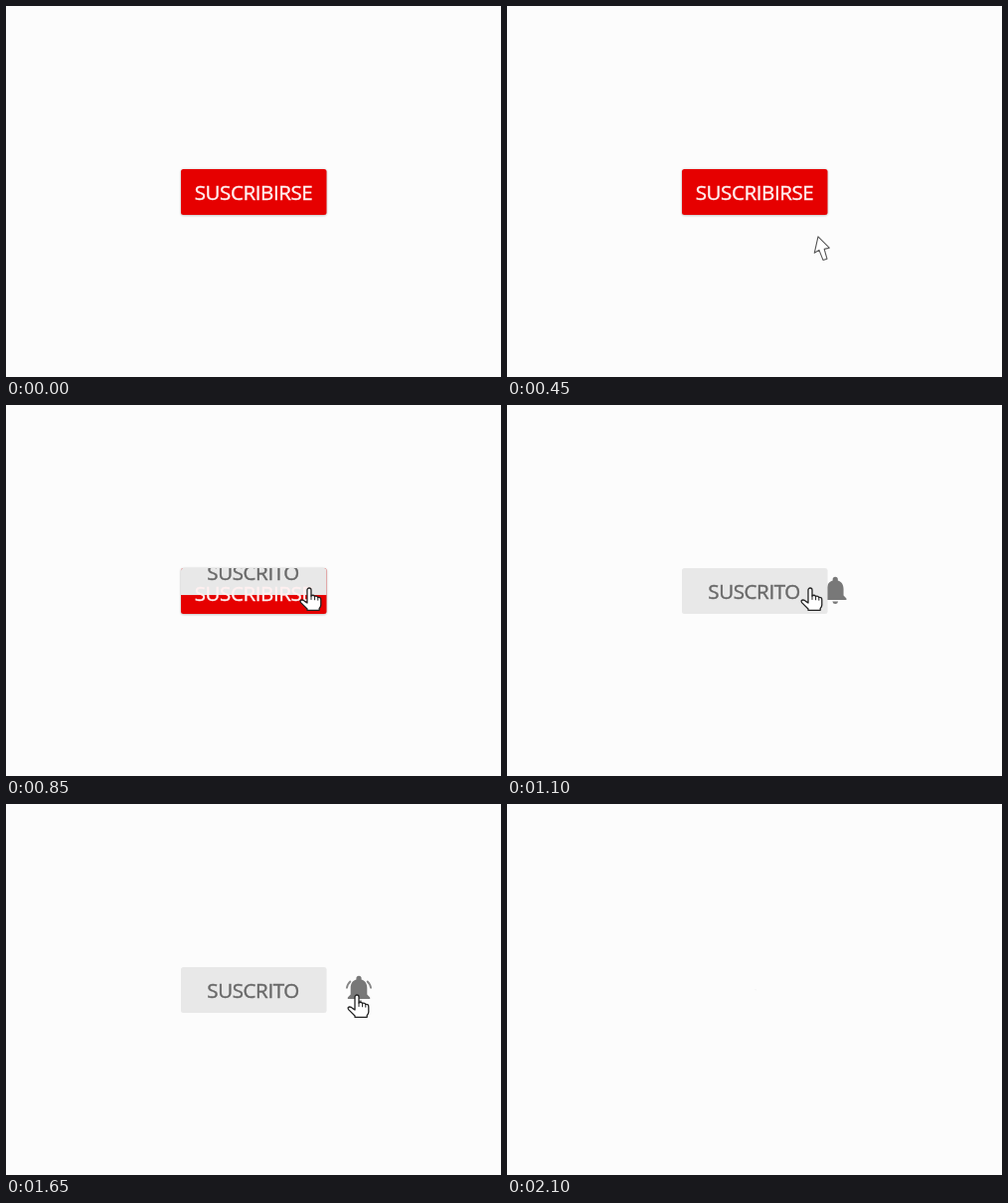
An HTML page that plays this animation: 498 by 373 pixels, repeating every 2.15 s.

```html
<!DOCTYPE html>
<html lang="es">
<head>
<meta charset="utf-8">
<title>Suscribirse</title>
<style>
  html, body { margin: 0; width: 100%; height: 100%; overflow: hidden; background: #fcfcfc; }
  svg { display: block; width: 100%; height: 100%; }
  text { font: 20.5px "Open Sans", "Noto Sans", sans-serif; letter-spacing: -.4px; text-anchor: middle; stroke-width: .4; }
  .cursor { fill: #fff; stroke-linejoin: round; stroke-linecap: round; }
</style>
</head>
<body>
<svg viewBox="0 0 498 373">
  <defs>
    <clipPath id="frame"><rect x="176" y="164" width="146.5" height="46" rx="2.5"/></clipPath>
    <filter id="soft" x="-10%" y="-20%" width="120%" height="140%"><feGaussianBlur stdDeviation="1"/></filter>
  </defs>
  <g id="scene">
    <g id="bell">
      <path fill="#787878" d="M-2.6 3 a2.6 2.8 0 0 1 5.2 0 V4 C6.4 5 8.3 8.4 8.3 12.5 V19 L11.2 22 V23.6 H-11.2 V22 L-8.3 19 V12.5 C-8.3 8.4 -6.4 5 -2.6 4 Z M-2.9 25 H2.9 Q2.3 27.6 0 27.6 T-2.9 25 Z"/>
      <path id="waves" fill="none" stroke="#858585" stroke-width="1.8" d="M-8.2 5.5 Q-11.7 8.6 -12.2 13 M8.2 5.5 Q11.7 8.6 12.2 13"/>
    </g>
    <g id="button">
      <rect x="176" y="164.4" width="146.5" height="46" rx="2.5" fill="#000" opacity=".3" filter="url(#soft)"/>
      <rect x="176" y="164" width="146.5" height="46" rx="2.5" fill="#e60000"/>
    </g>
    <g clip-path="url(#frame)">
      <g id="panel">
        <rect x="175" y="164" width="149" height="46" fill="#e8e8e8"/>
        <text x="248.6" y="194.6" fill="#686868" stroke="#686868">SUSCRITO</text>
      </g>
    </g>
    <text id="label" x="249" y="195" fill="#fff0f0" stroke="#fff0f0">SUSCRIBIRSE</text>
    <path id="arrow" class="cursor" stroke="#555" stroke-width="1.1" d="M0 0 L-3.7 16.5 L1 13.6 L5 23.6 L9 22.4 L6.2 12.6 L11.3 11.4 Z"/>
    <g id="hand" class="cursor" stroke="#222" stroke-width="1.3">
      <path d="M-2 2 a2 2 0 0 1 4 0 V8 q2 -1.6 3.6 .4 q2.2 -1 3.2 1 q3 -.6 3 2.6 V17 q0 2 -1.6 3.4 V22.3 H-2 V21 L-8.4 14.6 q-1.4 -2.2 1 -2.6 q1.6 -.2 3 1.4 L-2 15 Z"/>
      <path fill="none" stroke-width="1" d="M2 8 V11.5 M5.6 8.6 V11.8 M8.8 9.6 V12.2"/>
    </g>
  </g>
</svg>
<script>
  const LOOP = 2150, STEP = 50;
  const CX = 249.2, CY = 187;
  const el = id => document.getElementById(id);
  const [scene, bell, waves, button, panel, label, arrow, hand] =
    ["scene", "bell", "waves", "button", "panel", "label", "arrow", "hand"].map(el);

  const phase = (t, from, to) => Math.min(1, Math.max(0, (t - from) / (to - from)));
  const mix = (a, b, p) => a + (b - a) * p;
  const smooth = u => u * u * (3 - 2 * u);
  const sineOut = u => Math.sin(u * Math.PI / 2);

  const move = (node, x, y) => node.setAttribute("transform", `translate(${x} ${y})`);
  const zoom = (node, s) =>
    node.setAttribute("transform", `translate(${CX} ${CY}) scale(${s}) translate(${-CX} ${-CY})`);
  const show = (node, on) => node.setAttribute("visibility", on ? "visible" : "hidden");

  function cursorAt(t) {
    const u = phase(t, 50, 600);
    const arrive = (u + smooth(u)) / 2;
    const cross = smooth(phase(t, 1100, 1450));
    return [mix(340, 305, arrive) + 48 * cross, mix(394, 184, arrive) + 8 * cross];
  }

  function draw(t) {
    const [x, y] = cursorAt(t);
    const overButton = y < 210;
    move(arrow, x, y);
    move(hand, x, y);
    show(arrow, t > 0 && !overButton);
    show(hand, overButton);

    // Only the button face shrinks when pressed
    const press = Math.max(0, 1 - Math.abs(t - 650) / 100);
    zoom(button, 1 - .025 * press);

    const slide = sineOut(phase(t, 750, 1000));
    move(panel, 0, -46 * (1 - slide));
    show(panel, t > 750);
    show(button, t < 1000);
    move(label, 0, 3.4 * slide);
    label.setAttribute("opacity", 1 - phase(t, 850, 950));

    move(bell, mix(295, 355, sineOut(phase(t, 1000, 1250))), 172.5);
    show(bell, t > 1000);
    show(waves, t >= 1450);

    const exit = phase(t, 1850, 2100);
    zoom(scene, Math.max(.012, 1 - exit * exit));
  }

  function tick() {
    const t = performance.now() % LOOP;
    draw(Math.floor(t / STEP) * STEP);
    requestAnimationFrame(tick);
  }
  draw(0);
  requestAnimationFrame(tick);
</script>
</body>
</html>
```
